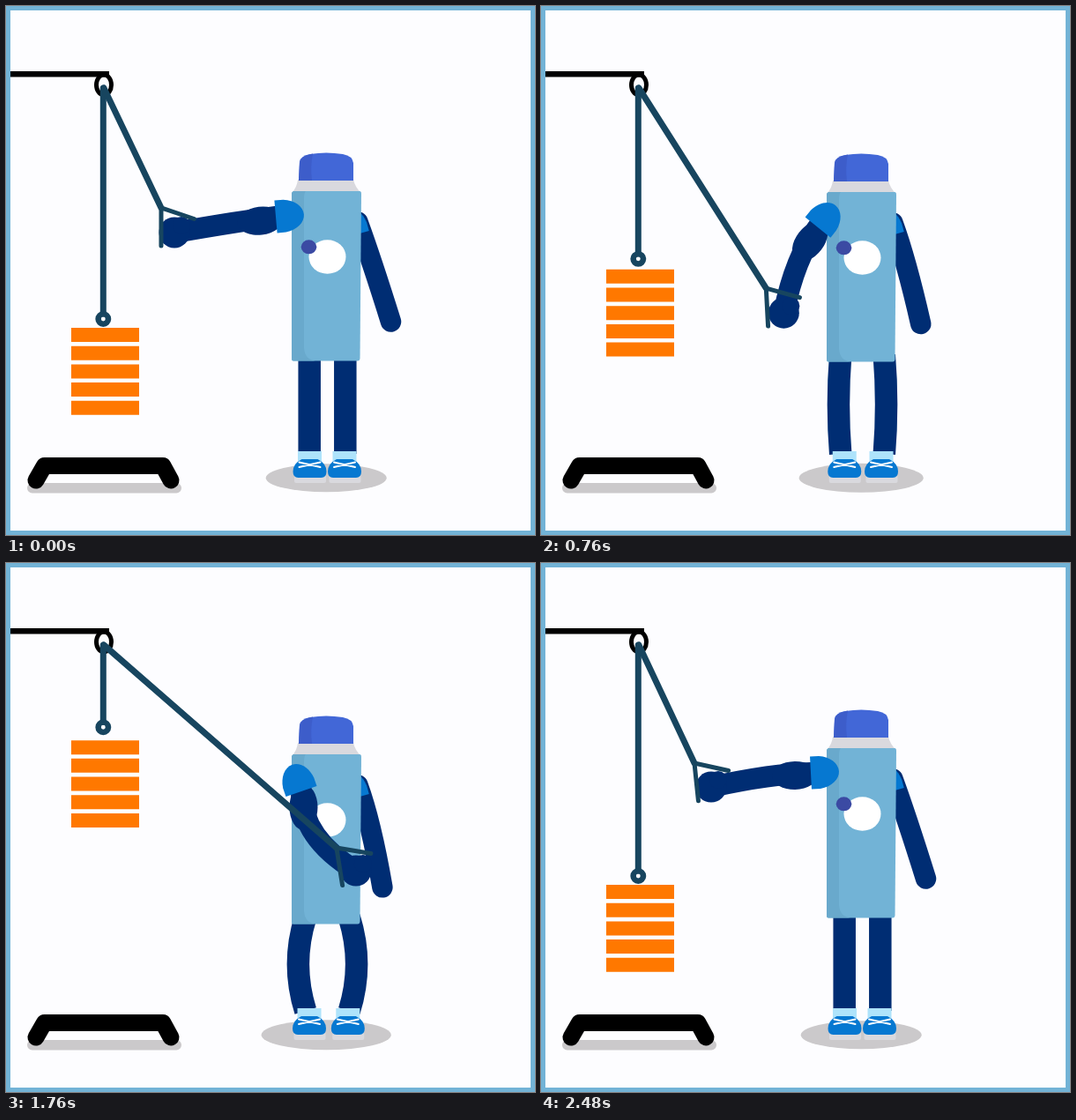
Animation, 600 px wide and 600 px high, one loop 2520 ms. Source, as an HTML page with a canvas:

```html
<!DOCTYPE html>
<html lang="en">
<head>
<meta charset="utf-8">
<title>Pulley workout</title>
<style>
  html, body { margin: 0; width: 100%; height: 100%; overflow: hidden; background: #fdfdff; }
  canvas { display: block; width: 600px; height: 600px; }
</style>
</head>
<body>
<canvas id="stage" width="600" height="600"></canvas>
<script>
const ctx = document.getElementById('stage').getContext('2d');
const LOOP = 2520;
const NAVY = '#002d73', BLUE = '#0678d1', SKY = '#72b3d6', ROPE = '#17455f', GREY = '#cbc9cb';
const RAD = Math.PI / 180;

// time, body drop, knee bend, load lift, sleeve angle, handle angle,
// then x,y of cuff, elbow, hand and rope end
const poses = [
  [0, 0, 0, 0, 5, 0, 306, 239, 265, 244, 191, 257, 176, 229],
  [400, -7, 0, 0, -6, 4, 305, 225, 265, 219, 193, 215, 178, 185],
  [760, 1, .5, 66, 51, -3, 314, 251, 288, 285, 275, 348, 255, 320],
  [1120, 7, 1, 131, 100, -8, 331, 259, 333, 303, 381, 362, 361, 337],
  [1470, 7, 1, 190, 118, -9, 338, 259, 337, 314, 413, 331, 391, 306],
  [1760, 7, .95, 164, 109, -9, 335, 259, 335, 312, 397, 349, 375, 323],
  [2080, 5, .37, 63, 40, -10, 313, 250, 271, 270, 240, 332, 218, 305],
  [2480, 0, 0, 0, 3, -6, 306, 238, 262, 239, 193, 254, 174, 227]
];

// Arm joints swing round the shoulder, so they are stored as radius and angle.
const shoulder = drop => [323, 238 + drop];
const keys = poses.map(p => {
  const [sx, sy] = shoulder(p[1]);
  const row = p.slice(0, 6);
  for (let i = 6; i < 12; i += 2) {
    const dx = sx - p[i], dy = p[i + 1] - sy;
    row.push(Math.hypot(dx, dy), Math.atan2(dy, dx));
  }
  return row.concat(p[12] - p[10], p[13] - p[11]);
});

function keyAt(i) {
  const n = keys.length, turn = Math.floor(i / n), k = keys[i - turn * n];
  return [k[0] + turn * LOOP, ...k.slice(1)];
}

// Monotone cubic interpolation: smooth, without overshoot.
function sample(t) {
  let i = keys.length - 1;
  while (keys[i][0] > t) i--;
  const [a, b, c, d] = [i - 1, i, i + 1, i + 2].map(keyAt);
  const span = c[0] - b[0], u = (t - b[0]) / span;
  const rate = (p, q, j) => (q[j] - p[j]) / (q[0] - p[0]);
  const tangent = (m, n) => m * n > 0 ? 2 * m * n / (m + n) : 0;
  return b.map((v, j) => {
    const r = rate(b, c, j);
    const m0 = tangent(rate(a, b, j), r) * span, m1 = tangent(r, rate(c, d, j)) * span;
    const k = c[j] - v;
    return v + u * (m0 + u * (3 * k - 2 * m0 - m1 + u * (m0 + m1 - 2 * k)));
  });
}

function fill(color, path) {
  ctx.fillStyle = color;
  ctx.fill(new Path2D(path));
}
function stroke(color, width, path, cap = 'round') {
  ctx.strokeStyle = color;
  ctx.lineWidth = width;
  ctx.lineCap = cap;
  ctx.lineJoin = 'round';
  ctx.stroke(new Path2D(path));
}
function ellipse(color, x, y, rx, ry = rx, angle = 0, line = 0) {
  ctx.beginPath();
  ctx.ellipse(x, y, rx, ry, angle, 0, 7);
  ctx.fillStyle = ctx.strokeStyle = color;
  ctx.lineWidth = line;
  line ? ctx.stroke() : ctx.fill();
}
function rect(color, x, y, w, h, r = 0) {
  ctx.fillStyle = color;
  ctx.beginPath();
  ctx.roundRect(x, y, w, h, r);
  ctx.fill();
}
function at(x, y, angle, draw) {
  ctx.save();
  ctx.translate(x, y);
  ctx.rotate(angle);
  draw();
  ctx.restore();
}
const sleeve = (x, y, angle) => at(x, y, angle, () =>
  fill(BLUE, 'M0 -18.5 L0 18.5 L-10 18.5 C-23 17 -32 9 -32 0 S-23 -17 -10 -18.5Z'));

function scenery() {
  rect('#fdfdff', 0, 0, 600, 600);
  rect(GREY, 24, 541, 175, 11.5, 6);
  stroke('#000', 19, 'M34 538 L43.5 521.5 H178 L187 538');
  rect('#000', 0, 74, 117, 6.5);
  ellipse('#000', 111, 89.5, 8.5, 11.5, 0, 5);
}

function weights(lift) {
  const ring = 355 - lift * 1.03;
  for (let i = 0; i < 5; i++) rect('#ff7800', 74, 365 - lift + i * 20.7, 77, 16);
  stroke(ROPE, 7, `M110.3 93 V${ring - 6}`);
  ellipse(ROPE, 110.3, ring, 5.7, 5.7, 0, 6.5);
}

function shoe(x) {
  rect('#aee3fb', x - 13.5, 505, 27, 12);
  rect('#d9d9de', x - 17.5, 532, 36, 9, 2);
  at(x, 0, 0, () => {
    fill(BLUE, 'M-9 514 H9 Q19 519 19 528 Q19 535 13 535 H-13 Q-19 535 -19 528 Q-19 519 -9 514Z');
    stroke('#fff', 2, 'M-12 517.5 L12 523 M-12 523 L12 517.5');
  });
}

function legs(drop, bend) {
  const end = 20.3 + 4.5 * Math.min(1, 2 * bend), knee = 2 * (20.3 + 13.5 * bend) - end;
  const top = 395 + drop;
  for (const side of [-1, 1]) {
    const x = v => 364.5 + side * v;
    stroke(NAVY, 25.5, `M${x(end)} ${top} Q${x(knee)} ${(top + 508) / 2} ${x(end)} 508`, 'butt');
  }
  shoe(344.5 - bend / 2);
  shoe(384 + 4 * bend);
}

function rearArm(bend) {
  const x = 436.5 - 10 * bend ** .8;
  stroke(NAVY, 23.5, `M399 245 Q414 286 ${x} ${358 + 3 * bend}`);
  sleeve(394, 260, 74 * RAD);
}

function torso() {
  fill('#d9d9de', 'M331 197 H394 Q396 206 403 212 H324 Q330 206 331 197Z');
  fill('#4267d7', 'M332 198 L333 177 Q334 170 345 168 Q363 165 382 168 Q393 170 394 178 V198Z');
  fill('#3d5dca', 'M332 198 L333 177 Q334 170 348 167.6 Q345 182 347 198Z');
  fill(SKY, 'M326 210 H401 Q403 210 403 213 L401.5 400 Q401 402.5 399 402.5 H326 Q324 402.5 324 400 V212Z');
  fill('#69a9cc', 'M326 210 H340 Q338 212 338 218 V388 Q339 401 351 402.5 H326 Q324 402.5 324 400 V212Z');
  ellipse('#fff', 364.5, 284.5, 21, 19.3);
  ellipse('#3b4aa3', 343.5, 273.3, 8.8, 8);
}

function frontArm(cuff, elbow, hand, angle) {
  const dir = Math.atan2(elbow[1] - cuff[1], elbow[0] - cuff[0]);
  stroke(NAVY, 24, `M${cuff} Q${elbow} ${hand}`);
  at(...cuff, dir, () => ellipse(NAVY, 18, -2.5, 26, 16));
  ellipse(NAVY, ...hand, 17.5);
  ellipse(NAVY, hand[0] + 8, hand[1] - 8, 10);
  sleeve(...cuff, angle);
}

function draw(t) {
  const [, drop, bend, lift, angle, tilt, ...arm] = sample(t);
  const [sx, sy] = shoulder(drop);
  const [cuff, elbow, hand] = [0, 2, 4].map(i =>
    [sx - arm[i] * Math.cos(arm[i + 1]), sy + arm[i] * Math.sin(arm[i + 1])]);
  const grip = [hand[0] + arm[6], hand[1] + arm[7]];

  scenery();
  weights(lift);
  ellipse(GREY, 363.2, 535.3, 68.5 + drop / 4 + 3.5 * bend, 16 + bend);
  legs(drop, bend);
  at(0, drop, 0, () => {
    rearArm(bend);
    torso();
  });
  frontArm(cuff, elbow, hand, (180 - angle) * RAD);
  stroke(ROPE, 7, `M111 93 L${grip}`);
  at(...grip, tilt * RAD, () => stroke(ROPE, 5, 'M0 43 L0 0 L37.5 12.5'));
  ctx.strokeStyle = SKY;
  ctx.lineWidth = 10;
  ctx.strokeRect(0, 0, 600, 600);
}

const start = performance.now();
function tick() {
  draw((performance.now() - start) % LOOP);
  requestAnimationFrame(tick);
}
tick();
</script>
</body>
</html>
```
